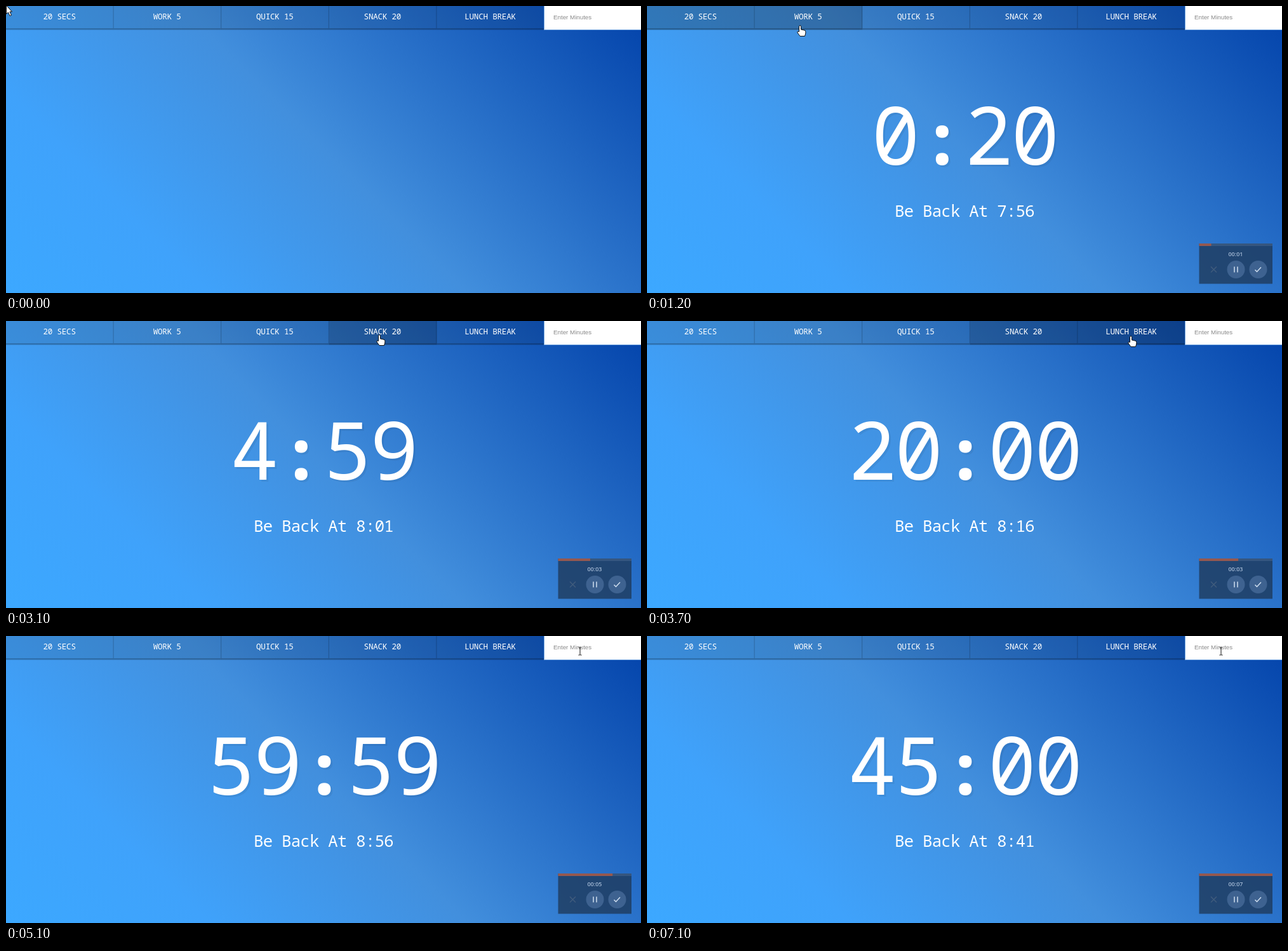
An HTML page that plays this animation: 1000x452 px, repeating every 7.2 s.

```html
<!DOCTYPE html>
<html lang="en">
<head>
<meta charset="utf-8">
<title>Countdown timer</title>
<style>
  html, body { margin: 0; height: 100%; overflow: hidden; }
  svg { display: block; width: 100vw; height: 100vh; }
  text { text-anchor: middle; fill: #fff; font-family: "Noto Sans Mono", monospace; white-space: pre; }
  .label { font-size: 12.6px; font-weight: 500; letter-spacing: -.23px; }
  #clock { font-size: 127px; letter-spacing: -2.9px; text-shadow: 3px 3px 0 rgba(0,0,0,.06); }
  #clock tspan { font-size: .87em; font-weight: 600; letter-spacing: 2px; }
  #back { font-size: 25.6px; font-weight: 500; letter-spacing: -.69px; }
  #field { font: 9.75px "Liberation Sans", Arial, sans-serif; text-anchor: start; }
  #stamp { font: 600 9px "Open Sans", sans-serif; fill: #a3b9d4; }
</style>
</head>
<body>
<svg viewBox="0 0 1000 452" preserveAspectRatio="none">
  <defs>
    <linearGradient id="sky" gradientUnits="userSpaceOnUse" x1="137" y1="589" x2="863" y2="-137">
      <stop offset="0" stop-color="#3ca8ff"/>
      <stop offset=".22" stop-color="#3fa2fb"/>
      <stop offset=".5" stop-color="#428fdd"/>
      <stop offset="1" stop-color="#0242aa"/>
    </linearGradient>
  </defs>
  <rect width="1000" height="452" fill="url(#sky)"/>
  <g id="bar"></g>

  <rect x="847.5" width="153" height="37.5" fill="#fff"/>
  <path d="M847.5 0V37.5H1000" fill="none" stroke="#7aaae2"/>
  <text id="field" x="862" y="20.5"></text>
  <path id="caret" d="M0 11.5V22.5" stroke="#222"/>

  <text id="clock" x="500" y="249.5"></text>
  <text id="back" x="500" y="332"></text>

  <g id="panel">
    <rect x="869.5" y="374" width="115.5" height="63.5" fill="#1f3a5c" fill-opacity=".8"/>
    <rect x="869.5" y="374" width="115.5" height="4" fill="#8aa0b8" fill-opacity=".2"/>
    <rect id="progress" x="869.5" y="374" height="4" fill="#95584f"/>
    <text id="stamp" x="927" y="393.5"></text>
    <g fill="#3e6290"><circle cx="927.5" cy="415" r="14"/><circle cx="962.5" cy="415" r="14"/></g>
    <g fill="none" stroke-width="1.5">
      <path d="M888 410.5l9 9m0-9l-9 9" stroke="#405c7d"/>
      <path d="M925 410.5v9m5-9v9M957.5 415.5l3 3 6.5-7" stroke="#d0dff0"/>
    </g>
  </g>

  <g id="cursor" stroke="#111" stroke-linejoin="round">
    <path id="arrow" fill="#fff" d="M.5-1V12.5L3.5 10 6 15.5 8.5 14.5 6 9H9.5Z"/>
    <path id="hand" fill="#fff" d="M-1.5 9.5V1.3a1.5 1.5 0 0 1 3 0V6l5.5 1.2q1.8.4 1.8 2.2V12L7.5 16.5H0L-4 11q-.8-1.8 1-2Z"/>
    <path id="beam" fill="none" d="M-2.5-6H-.5L0-5.5 .5-6H2.5M0-5.5V5.5M-2.5 6H-.5L0 5.5 .5 6H2.5"/>
  </g>
</svg>
<script>
const LOOP = 7200, CELL = 169.6;
const $ = id => document.getElementById(id);
const show = (id, on) => $(id).style.display = on ? "" : "none";

$("bar").innerHTML = ["20 SECS", "WORK 5", "QUICK 15", "SNACK 20", "LUNCH BREAK"].map((name, i) => {
  const x = i * CELL;
  return `<rect x="${x}" width="${CELL}" height="37.5" class="cell"/>
    <rect x="${x}" y="35" width="${CELL}" height="2.5" fill-opacity=".2"/>
    <rect x="${x + CELL - 1}" width="1" height="35" fill-opacity=".22"/>
    <text class="label" x="${x + CELL / 2 - .7}" y="21">${name}</text>`;
}).join("");
const cells = document.querySelectorAll(".cell");

// [time, seconds to count, return time]
const runs = [[600, 20, "7:56"], [1800, 300, "8:01"], [3150, 1200, "8:16"],
              [3850, 3600, "8:56"], [6300, 2700, "8:41"]];
// [time, button]; 5 is the input
const focus = [[0, -1], [550, 0], [1750, 1], [3050, 3], [3800, 4], [4600, 5]];
// [time, x, y]
const path = [[0, 0, 0], [500, 85, 20], [700, 85, 20], [1200, 241, 31], [1650, 290, 26.5],
              [2100, 290, 26.5], [2900, 588, 22], [3250, 588, 22], [3700, 762, 24],
              [3950, 762, 24], [4300, 904, 24], [LOOP, 904, 24]];
const recorded = [[0, 0], [1200, 19], [2000, 32], [3100, 50.5], [4400, 74.5], [5900, 98.5], [7100, 115.5], [LOOP, 115.5]];

const last = (list, t) => list.filter(e => e[0] <= t).pop();

function along(list, t, k, ease = u => u) {
  const i = list.findIndex(e => e[0] > t), a = list[i - 1], b = list[i];
  return a[k] + (b[k] - a[k]) * ease((t - a[0]) / (b[0] - a[0]));
}

function draw(t) {
  const smooth = u => u * u * (3 - 2 * u);
  const x = along(path, t, 1, smooth), y = along(path, t, 2, smooth);
  const active = last(focus, t)[1], hover = t < 100 ? -1 : Math.floor(x / CELL);
  cells.forEach((c, i) => c.setAttribute("fill-opacity", i === active || i === hover ? .24 : .1));

  $("cursor").setAttribute("transform", `translate(${x} ${y})`);
  show("arrow", t < 100);
  show("hand", t >= 100 && x < 848);
  show("beam", x >= 848);

  const run = last(runs, t);
  const left = run && run[1] - Math.floor((t - run[0]) / 1000);
  $("clock").innerHTML = run
    ? `${Math.floor(left / 60)}<tspan dx="5">:</tspan>${String(left % 60).padStart(2, "0")}` : "";
  $("back").textContent = run ? "Be Back At " + run[2] : "";

  const typed = t < 5400 || t >= 6300 ? "" : t < 5650 ? "4" : "45";
  $("field").textContent = typed || "Enter Minutes";
  $("field").style.fill = typed ? "#222" : "#8a8a8a";
  const since = t - last([[4600], [5400], [5650], [6300]], Math.max(t, 4600))[0];
  show("caret", active === 5 && since % 1000 < 500);
  $("caret").setAttribute("transform", `translate(${862.5 + typed.length * 5.5} 0)`);

  show("panel", t >= 100);
  $("progress").setAttribute("width", along(recorded, t, 1));
  $("stamp").textContent = "00:0" + Math.max(0, Math.floor((t - 1) / 1000));
}

const start = performance.now();
(function frame() {
  draw((performance.now() - start) % LOOP);
  requestAnimationFrame(frame);
})();
</script>
</body>
</html>
```
